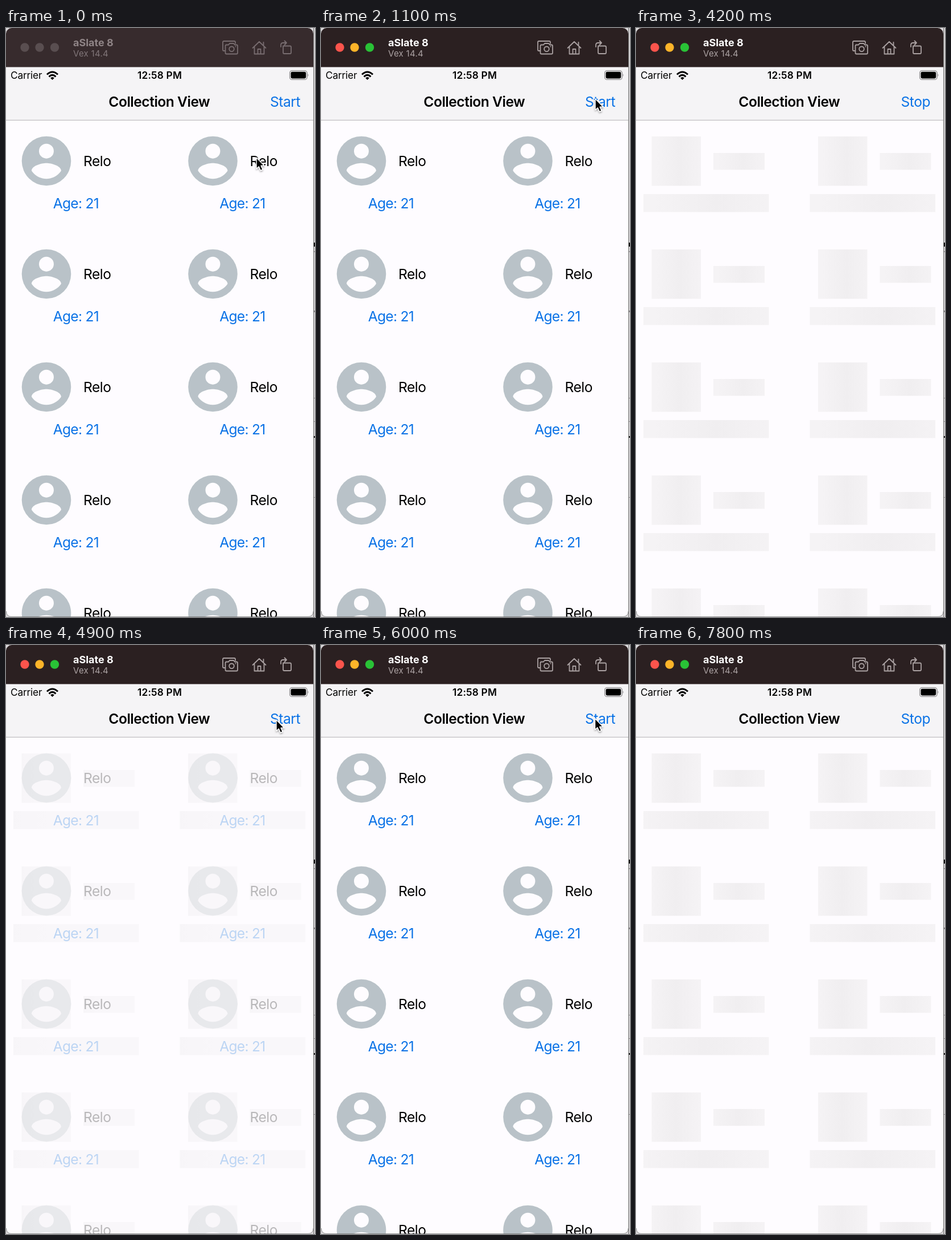
Write an HTML page that moves like this. It is 543x1032 px and loops after 8000 ms.

```html
<!DOCTYPE html>
<html lang="en">
<head>
<meta charset="utf-8">
<title>Collection View</title>
<style>
  html, body { margin: 0; width: 100%; height: 100%; overflow: hidden; background: #fff; }
  svg { display: block; width: 543px; height: 1032px; }
  text { font-family: Inter, Roboto, sans-serif; font-size: 24.6px; letter-spacing: -.02em; fill: #000; }
  .blue { fill: #0a72e6; }
  .age { letter-spacing: -.03em; }
  .small { font-size: 17.3px; letter-spacing: -.01em; }
  .semi { font-weight: 600; }
  .clock { letter-spacing: .01em; }
  .line { fill: none; stroke-width: 1.8; stroke-linejoin: round; stroke-linecap: round; }
</style>
</head>
<body>
<svg viewBox="0 0 543 1032" xmlns="http://www.w3.org/2000/svg">
  <defs>
    <linearGradient id="shimmer">
      <stop offset="0" stop-color="#f5f3f5"/>
      <stop offset=".5" stop-color="#f0eef0"/>
      <stop offset="1" stop-color="#f5f3f5"/>
    </linearGradient>
    <clipPath id="window"><rect width="540" height="1032" rx="10"/></clipPath>
    <filter id="shadow" x="-60%" y="-40%" width="220%" height="200%">
      <feDropShadow dx="0" dy="2" stdDeviation="1.6" flood-opacity=".35"/>
    </filter>
    <g id="person">
      <circle cx="71" cy="233" r="43.3" fill="#b9c2c8"/>
      <path transform="translate(19 181) scale(4.33)" fill="#fefcff" d="M12 5a3 3 0 1 1 0 6a3 3 0 1 1 0-6zM12 19.2c-2.5 0-4.71-1.28-6-3.22.03-1.99 4-3.08 6-3.08s5.97 1.09 6 3.08c-1.29 1.94-3.5 3.22-6 3.22z"/>
      <text x="136" y="242">Relo</text>
      <text x="82.8" y="315.5" class="blue age">Age: 21</text>
    </g>
    <g id="bones" fill="url(#shimmer)">
      <rect x="27.5" y="190" width="86.5" height="86.5"/>
      <rect x="136" y="219" width="90" height="29.5"/>
      <rect x="13" y="291" width="220.5" height="31.5"/>
    </g>
  </defs>

  <!-- desktop strip beside the window -->
  <rect width="543" height="1032" fill="#dcdadc"/>
  <g fill="#8d8b8d">
    <rect x="540" width="1.2" height="1032" fill="#777"/>
    <rect x="541" y="376" width="2" height="7" fill="#111"/>
    <rect x="541" y="391" width="2" height="1.5"/>
    <rect x="541" y="495" width="2" height="3"/>
    <rect x="541" y="648" width="2" height="1"/>
    <rect x="541" y="689" width="2" height="1"/>
    <rect x="541" y="715" width="2" height="3" fill="#222"/>
    <rect x="541" y="822" width="2" height="1"/>
  </g>

  <g clip-path="url(#window)">
    <rect width="540" height="1032" fill="#fefcff"/>
    <g id="people"></g>
    <g id="skeleton"></g>

    <rect y="68" width="540" height="93" fill="#f5f4f6"/>
    <rect y="161" width="540" height="1" fill="#b6b4b7"/>
    <text x="8" y="89" class="small">Carrier</text>
    <g fill="none" stroke="#000" stroke-width="3">
      <path d="M72 81.5Q81.5 72.5 91 81.5M75.5 85.3Q81.5 79.5 87.5 85.3"/>
      <path d="M81.5 91l-3.4-3.6q3.4-3 6.8 0z" fill="#000" stroke="none"/>
    </g>
    <text x="270" y="89" text-anchor="middle" class="small semi clock">12:58 PM</text>
    <rect x="498.6" y="74.8" width="30.4" height="15.6" rx="4" fill="none" stroke="#8b898b" stroke-width="1.3"/>
    <rect x="500.5" y="76.8" width="26.6" height="11.6" rx="2.3"/>
    <path d="M530.5 80q2 2.6 0 5.2z" fill="#8b898b"/>
    <text x="269.3" y="137.6" text-anchor="middle" class="semi">Collection View</text>
    <text id="action" x="517" y="137.6" text-anchor="end" class="blue">Start</text>

    <rect id="titlebar" width="540" height="68.5"/>
    <g id="lights"></g>
    <text id="device" x="118" y="32" style="font-size:18px;font-weight:700;letter-spacing:0">aSlate 8</text>
    <text id="system" x="118" y="50" style="font-size:15px;letter-spacing:.02em">Vex 14.4</text>
    <g id="tools" class="line">
      <path d="M385 40h-2q-2 0-2-2V25q0-2 2-2h18q2 0 2 2v2"/>
      <path d="M387.5 29.5h3.5l2-2.5h7l2 2.5h3q2 0 2 2v12q0 2-2 2h-17.5q-2 0-2-2v-12q0-2 2-2z"/>
      <circle cx="396.5" cy="36.8" r="4.3"/>
      <path d="M403.5 32.5h.1"/>
      <path d="M433.5 35L445 24l11.5 11M436.5 33v12.5h17V33M442.5 45v-8h5v8M452.5 30v-5"/>
      <path d="M487 31.5h12q2 0 2 2v9.500q0 2-2 2h-10q-2 0-2-2zM483 33v-3q0-4 4-4h6M489.5 22.5l3.5 3.5-3.5 3.5"/>
    </g>
  </g>
  <path d="M.5 1022Q.5 1031.500 10 1031.500H530Q540 1031.500 540 1022" fill="none" stroke="#777" stroke-width=".8"/>

  <path id="cursor" filter="url(#shadow)" d="M0 0V19.500L4.300 15.700L7.300 22.600L11 21L8 14.300H13.800Z" fill="#000" stroke="#fff" stroke-width="1.4" stroke-linejoin="round"/>
</svg>
<script>
const LOOP = 8000, STEP = 100, FADE = 200, SWEEP = 1030;
const SVG = 'http://www.w3.org/2000/svg';
const $ = id => document.getElementById(id);
const clamp = v => Math.max(0, Math.min(1, v));

function add(parent, name, attrs) {
  const node = document.createElementNS(SVG, name);
  for (const key in attrs) node.setAttribute(key, attrs[key]);
  return parent.appendChild(node);
}

for (let row = 0; row < 5; row++) {
  for (let col = 0; col < 2; col++) {
    const place = { x: col * 292.5, y: row * 198 };
    add($('people'), 'use', { href: '#person', ...place });
    add($('skeleton'), 'use', { href: '#bones', ...place });
  }
}
const lights = [33, 59, 85.5].map(cx => add($('lights'), 'circle', { cx, cy: 34, r: 7.7 }));
const lightColors = ['#fb544c', '#fdb429', '#29c236'];

const loading = [
  { show: 1300, hide: 4900, sweep: 1430 },
  { show: 7000, hide: Infinity, sweep: 7128 }
];
const visits = [
  { from: 0, until: 1300, path: [[200, 440, 227], [850, 482, 124]] },
  { from: 4600, until: 7300, path: [[4600, 478, 141], [4900, 475, 131], [5800, 481, 129],
                                    [6800, 486, 127], [7000, 487, 127], [7200, 517, 118]] }
];

// Ease-in curve cubic-bezier(.42, 0, 1, 1), solved by bisection.
function easeIn(p) {
  let lo = 0, hi = 1;
  for (let i = 0; i < 20; i++) {
    const s = (lo + hi) / 2;
    const x = 1.26 * s * (1 - s) ** 2 + 3 * s * s - 2 * s ** 3;
    if (x < p) lo = s; else hi = s;
  }
  return 3 * lo * lo - 2 * lo ** 3;
}

function along(path, t) {
  const next = path.findIndex(key => key[0] > t);
  if (next === 0) return path[0].slice(1);
  if (next < 0) return path[path.length - 1].slice(1);
  const [a, b] = [path[next - 1], path[next]];
  const u = (t - a[0]) / (b[0] - a[0]);
  const k = u * u * (3 - 2 * u);
  return [1, 2].map(i => a[i] + (b[i] - a[i]) * k);
}

function drawWindow(active) {
  $('titlebar').setAttribute('fill', active ? '#2b2021' : '#372b2d');
  $('device').style.fill = active ? '#fff' : '#8f8486';
  $('system').style.fill = active ? '#aca3a4' : '#82777a';
  $('tools').setAttribute('stroke', active ? '#aaa1a2' : '#786d70');
  lights.forEach((light, i) => light.setAttribute('fill', active ? lightColors[i] : '#594e50'));
}

function drawSkeleton(t) {
  const run = loading.find(r => t >= r.show && t < r.hide + FADE);
  let alpha = 0;
  if (run) {
    const fade = start => clamp((t - start + STEP) / FADE);
    alpha = fade(run.show) - fade(run.hide);
    const phase = Math.max(0, t - run.sweep) % SWEEP / SWEEP;
    const center = -.5 + 2 * easeIn(phase);
    $('shimmer').setAttribute('x1', center - .5);
    $('shimmer').setAttribute('x2', center + .5);
  }
  $('people').setAttribute('opacity', 1 - alpha);
  $('skeleton').setAttribute('opacity', alpha);
  $('action').textContent = run && t < run.hide ? 'Stop' : 'Start';
}

function drawCursor(t) {
  const visit = visits.find(v => t >= v.from && t < v.until);
  $('cursor').style.display = visit ? '' : 'none';
  if (visit) $('cursor').setAttribute('transform', `translate(${along(visit.path, t)})`);
}

function draw(now) {
  const t = Math.floor(now % LOOP / STEP) * STEP;
  drawWindow(t >= 800);
  drawSkeleton(t);
  drawCursor(t);
}

function tick(now) {
  draw(now);
  requestAnimationFrame(tick);
}
draw(0);
requestAnimationFrame(tick);
</script>
</body>
</html>
```
